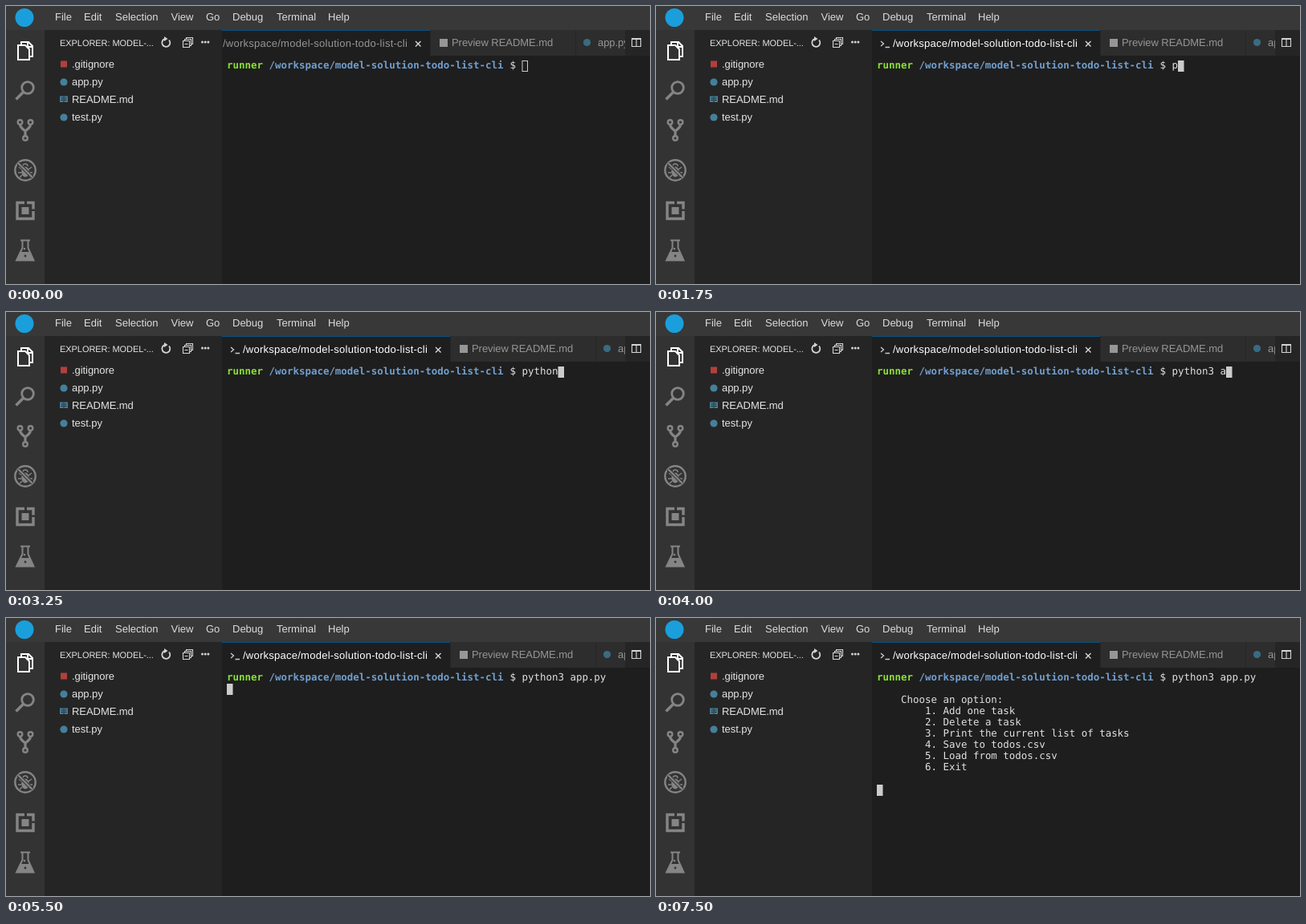
An HTML page that plays this animation: 802 px wide and 347 px high, repeating every 8000 ms.

```html
<!DOCTYPE html>
<html lang="en">
<head>
<meta charset="utf-8">
<title>Terminal session</title>
<style>
  html, body { margin: 0; width: 100%; height: 100%; overflow: hidden; background: #1e1e1e; }
  svg { display: block; }
  text { white-space: pre; text-rendering: geometricPrecision; }
  .ui { font: 13px "Liberation Sans", Arial, sans-serif; fill: #dcdcdc; }
  .small { font-size: 11px; letter-spacing: -.15px; }
  .side { fill: #e4e4e4; letter-spacing: -.06px; }
  .term { font: 12.457px "DejaVu Sans Mono", monospace; fill: #e2e2e2; }
  .bold { font-weight: bold; }
  .user { fill: #8ae234; }
  .path { fill: #729fcf; }
  .icon { fill: none; stroke: #858585; stroke-width: 2.4; }
  .solid { fill: #858585; stroke: none; }
  .tool { fill: none; stroke: #d4d4d4; stroke-width: 1.1; }
  .dim { fill: #969696; letter-spacing: -.06px; }

  .tabs { animation: scroll 8s step-end infinite; }
  .label { animation: light 8s step-end infinite; }
  .thumb { animation: flash 8s step-end infinite; }
  @keyframes scroll { 0% { transform: translateX(-25px); } 9.375%, 100% { transform: none; } }
  @keyframes light { 0% { fill: #969696; } 9.375%, 100% { fill: #fff; } }
  @keyframes flash { 0% { opacity: 0; } 9.375% { opacity: 1; } 12.5%, 100% { opacity: 0; } }
</style>
</head>
<body>
<svg width="802" height="347" viewBox="0 0 802 347">
  <defs>
    <clipPath id="tabClip"><rect x="269" y="30" width="502" height="32"/></clipPath>
  </defs>

  <!-- panels -->
  <rect width="802" height="347" fill="#1e1e1e"/>
  <rect y="30" width="48" height="317" fill="#333"/>
  <rect x="48" y="30" width="221" height="317" fill="#252526"/>
  <rect x="269" y="30" width="533" height="32" fill="#252526"/>
  <rect width="802" height="30" fill="#383838"/>

  <circle cx="23" cy="14.5" r="11.5" fill="#1a9fdc"/>
  <g class="ui" id="menu"></g>

  <!-- activity bar -->
  <g class="icon">
    <g stroke="#fff" stroke-width="2">
      <path d="M15 49H24L29 54V67H15Z"/>
      <path d="M19 49V45H28L33 50V63H29M27 45V51H33"/>
    </g>
    <g stroke-width="2.8">
      <circle cx="27" cy="102" r="7.3"/>
      <path d="M22 107 12.5 116.5" stroke-width="3.6"/>
    </g>
    <g>
      <circle cx="17.5" cy="145" r="2.8"/>
      <circle cx="30.5" cy="145" r="2.8"/>
      <circle cx="24" cy="165" r="2.8"/>
      <path d="M17.5 148Q18 152 24 156V162M30.5 148Q30 152 24 156" stroke-width="3.2"/>
    </g>
    <g>
      <circle cx="24" cy="205" r="12.7"/>
      <ellipse class="solid" cx="24" cy="207" rx="4.8" ry="6.5"/>
      <path d="M21 200a3 3 0 0 1 6 0M20 204 16 201M28 204 32 201M19 208H15M29 208H33M20 211 17 214M28 211 31 214" stroke-width="1.5"/>
      <path d="M15 196 33 214" stroke="#333" stroke-width="4.5"/>
      <path d="M15 196 33 214"/>
    </g>
    <g stroke-width="3.4">
      <path d="M23 245.500H14V265.500H34V256M26 245.500H34V253.500"/>
      <rect class="solid" x="19.500" y="251" width="9" height="9"/>
    </g>
    <g>
      <path d="M18 292.500H30M20.500 293V302L13 317.500H34.500L27.500 302V293" stroke-width="2"/>
      <path class="solid" d="M18.500 307H29L34 317H14Z"/>
      <circle class="solid" cx="23" cy="303" r="1.3"/>
      <circle cx="24" cy="312" r="1.4" fill="#333" stroke="none"/>
    </g>
  </g>

  <!-- explorer -->
  <text class="ui side small" x="67" y="50">EXPLORER: MODEL-...</text>
  <g class="tool">
    <path d="M203 42.500A5 5 0 1 1 197.500 41.200" stroke-width="1.8"/>
    <path d="M197 38V44L201.500 41Z" fill="#d4d4d4" stroke="none"/>
    <path d="M224.500 41.500V39.500H232.500V47.500H230.500M222.500 43.500V41.500H230.500V49.500H228.500M220.500 43.500H228.500V51.500H220.500ZM222.500 47.500H226.500"/>
    <g fill="#d4d4d4" stroke="none">
      <circle cx="244.500" cy="45" r="1.5"/><circle cx="248.200" cy="45" r="1.5"/><circle cx="251.900" cy="45" r="1.5"/>
    </g>
  </g>
  <g class="ui side" id="files"></g>
  <rect x="68" y="68.500" width="8" height="8" fill="#b1403c"/>
  <circle cx="72" cy="95" r="4.6" fill="#45809b"/>
  <rect x="67" y="112.500" width="10" height="7.500" fill="#45809b"/>
  <path d="M72 113V120M68.500 115H71M68.500 117.500H71M73 115H75.500M73 117.500H75.500" stroke="#252526"/>
  <circle cx="72" cy="139" r="4.6" fill="#45809b"/>

  <!-- tabs -->
  <g clip-path="url(#tabClip)">
    <g class="tabs ui">
      <rect x="269" y="30" width="284" height="32" fill="#1e1e1e"/>
      <rect x="269" y="30" width="284" height="1" fill="#0b5080"/>
      <rect x="554" y="30" width="180" height="32" fill="#2d2d2d"/>
      <rect x="735" y="30" width="90" height="32" fill="#2d2d2d"/>
      <path d="M280 44 283.500 47 280 50M285.500 51.500H291" fill="none" stroke="#ccc" stroke-width="1.3"/>
      <text class="label" x="295" y="51" letter-spacing=".25">/workspace/model-solution-todo-list-cli</text>
      <path d="M535 44 541.500 50.500M541.500 44 535 50.500" fill="none" stroke="#ddd" stroke-width="1.3"/>
      <rect x="565" y="41" width="10" height="10" fill="#969696"/>
      <text class="dim" x="580" y="50">Preview README.md</text>
      <circle cx="748.500" cy="45.500" r="4.6" fill="#3a6b82"/>
      <text class="dim" x="762" y="50">app.py</text>
    </g>
    <rect class="thumb" x="554" y="60" width="163" height="2" fill="#3a3a3a"/>
  </g>
  <path class="tool" d="M779.500 40.500H790.500V50.500H779.500ZM785 40.500V50.500M779.500 41.500H790.500"/>

  <!-- terminal -->
  <g class="term">
    <text class="bold user" x="275" y="78">runner</text>
    <text class="bold path" x="327.500" y="78">/workspace/model-solution-todo-list-cli</text>
    <text x="627.500" y="78">$</text>
    <text id="command" x="642.500" y="78"></text>
    <g id="output"></g>
  </g>
  <rect id="cursor"/>
</svg>

<script>
  const LOOP = 8000, LEFT = 275, TOP = 68, CELL = 7.5, ROW = 14, PROMPT = 49;
  const FOCUS = 750, ENTER = 5500, PRINT = 5750;
  const COMMAND = "python3 app.py";
  // [time, characters typed]
  const KEYS = [[0, 0], [1750, 1], [2250, 2], [2500, 5], [3250, 6], [3500, 7],
    [4000, 9], [4250, 10], [4500, 11], [4750, 13], [5000, 14]];
  const OPTIONS = ["Add one task", "Delete a task", "Print the current list of tasks",
    "Save to todos.csv", "Load from todos.csv", "Exit"];

  const $ = id => document.getElementById(id);

  function addText(parent, x, y, content) {
    const el = document.createElementNS("http://www.w3.org/2000/svg", "text");
    el.setAttribute("x", x);
    el.setAttribute("y", y);
    el.textContent = content;
    parent.append(el);
  }

  const MENU = { File: 61, Edit: 97, Selection: 136, View: 205.5, Go: 249,
    Debug: 282, Terminal: 337, Help: 401 };
  for (const [name, x] of Object.entries(MENU)) addText($("menu"), x, 18, name);

  [".gitignore", "app.py", "README.md", "test.py"]
    .forEach((name, i) => addText($("files"), 82, 77 + 22 * i, name));

  const printLine = (col, row, line) =>
    addText($("output"), LEFT + col * CELL, TOP + 10 + row * ROW, line);
  printLine(4, 2, "Choose an option:");
  OPTIONS.forEach((option, i) => printLine(8, 3 + i, `${i + 1}. ${option}`));

  function placeCursor(col, row, filled) {
    const inset = filled ? 0 : 0.5, box = $("cursor");
    box.setAttribute("x", LEFT + col * CELL + inset);
    box.setAttribute("y", TOP + row * ROW + inset);
    box.setAttribute("width", CELL - 2 * inset);
    box.setAttribute("height", ROW - 2 * inset);
    box.setAttribute("fill", filled ? "#ccc" : "none");
    box.setAttribute("stroke", filled ? "none" : "#ccc");
  }

  function draw(t) {
    const typed = KEYS.filter(([at]) => at <= t).pop()[1];
    $("command").textContent = COMMAND.slice(0, typed);
    $("output").style.display = t >= PRINT ? "" : "none";
    if (t >= PRINT) placeCursor(0, 10, true);
    else if (t >= ENTER) placeCursor(0, 1, true);
    else placeCursor(PROMPT + typed, 0, t >= FOCUS);
  }

  const start = performance.now();
  function tick() {
    draw((performance.now() - start) % LOOP);
    requestAnimationFrame(tick);
  }
  tick();
</script>
</body>
</html>
```
